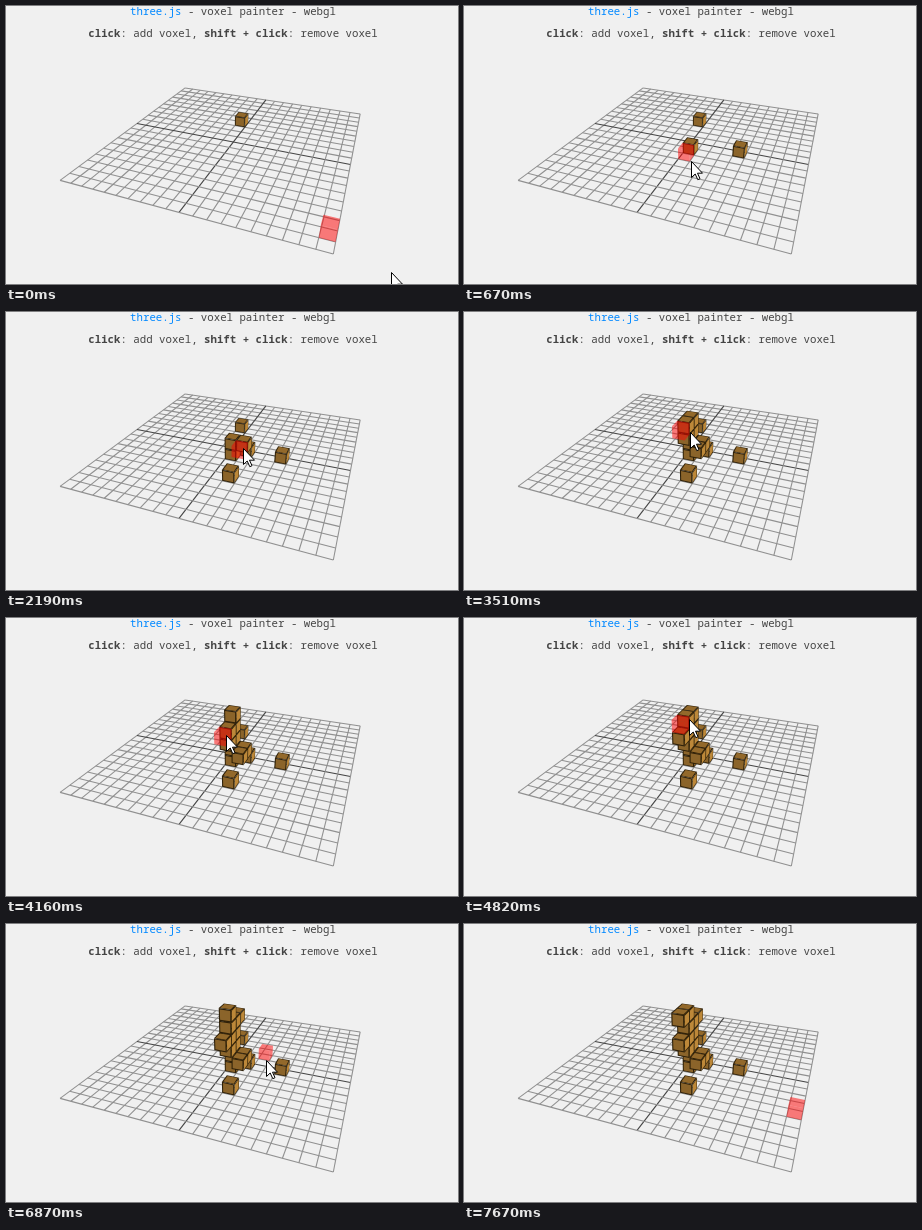
Animation, 452 px wide and 278 px high, one loop 8.13 s. Source, as an HTML page with a canvas:

```html
<!DOCTYPE html>
<html lang="en">
<head>
<meta charset="utf-8">
<title>voxel painter</title>
<style>
  html, body { margin: 0; width: 100%; height: 100%; overflow: hidden; background: #f0f0f0; }
  canvas { position: absolute; left: 0; top: 0; display: block; }
  p {
    position: absolute; left: 0; width: 100%; margin: 0; text-indent: 2px;
    font: 10.72px/14px "Noto Sans Mono", monospace; color: #444;
    text-align: center; white-space: nowrap;
  }
  p span { color: #08f; }
</style>
</head>
<body>
<canvas width="452" height="278"></canvas>
<p style="top:-2px"><span>three.js</span> - voxel painter - webgl</p>
<p style="top:20px"><b>click</b>: add voxel, <b>shift + click</b>: remove voxel</p>
<script>
const ctx = document.querySelector('canvas').getContext('2d');
const LOOP = 8130, BEAT = LOOP / 29, STEP = 66;
const FOCAL = 364, CX = 227.4, CY = 136;
const SIZE = 50, HALF = SIZE / 2;
const WOOD = ['#bd8839', '#93692b', '#8b642a'];
const EDGE = '#2e2009', MARKER = 'rgba(255,0,0,.5)';

// Camera basis
const dot = (a, b) => a[0] * b[0] + a[1] * b[1] + a[2] * b[2];
const cross = (a, b) => [a[1] * b[2] - a[2] * b[1], a[2] * b[0] - a[0] * b[2], a[0] * b[1] - a[1] * b[0]];
const unit = a => a.map(c => c / Math.hypot(...a));
const eye = [500, 800, 1300];
const forward = unit(eye.map(c => -c));
const right = unit(cross(forward, [0, 1, 0]));
const up = cross(right, forward);

function project(p) {
  const d = p.map((c, i) => c - eye[i]);
  const k = FOCAL / dot(d, forward);
  return [CX + k * dot(d, right), CY - k * dot(d, up)];
}

// One stop per beat: three numbers fill a grid cell, two are a screen point
const stops = [
  [385, 266], [4, 0, 0], [0, 0, 1], [1, 0, 4], [1, 0, 0], [233, 145],
  [0, 1, 1], [1, 1, 1], [1, 1, 2], [0, 2, 1], [0, 3, 1], [0, 2, 2], [0, 3, 2], [229, 120],
  [0, 4, 1], [0, 3, 3], [0, 4, 2], [225.5, 101.5], [0, 5, 2], [0, 4, 0], [221, 95],
  [223, 83], [223, 83], [335, 215], [335, 215], [0, 5, 3], [217.5, 89], [461, 298]
];

// The pointer rests, then glides to the next stop
const REST = 0.2, GLIDE = 0.7;
// Offset from the pointer's tip to its active point
const HOT = [-1.5, -2];

const center = cell => cell.map(c => c * SIZE + HALF);
const voxels = [{ born: 0, pos: center([-1, 0, -4]) }];
const filled = pos => voxels.some(v => v.pos.join() === pos.join());

// A click lands on the face the new voxel rests against: below, behind or beside
function clickPoint(pos) {
  const behind = axis => pos.map((c, i) => i === axis ? c - SIZE : c);
  const axis = pos[1] < SIZE || filled(behind(1)) ? 1 : filled(behind(2)) ? 2 : 0;
  const contact = pos.map((c, i) => i === axis ? c - HALF : c);
  return project(contact).map((c, i) => c - HOT[i]);
}

const path = stops.map((stop, i) => {
  if (stop.length === 2) return stop;
  const pos = center(stop), point = clickPoint(pos);
  voxels.push({ born: (i + REST) * BEAT, pos });
  return point;
});

function pointerAt(t) {
  const i = Math.floor(t / BEAT), last = path.length - 1;
  const u = Math.min(1, Math.max(0, (t / BEAT - i - REST) / GLIDE));
  const ease = 1 - (1 - u) ** 2;
  const from = path[Math.min(i, last)], to = path[Math.min(i + 1, last)];
  return from.map((c, k) => c + (to[k] - c) * ease);
}

// Cell next to the surface under the pointer, or null
function pick(t) {
  const [x, y] = pointerAt(t);
  const u = (x + HOT[0] - CX) / FOCAL, v = (CY - y - HOT[1]) / FOCAL;
  const ray = forward.map((c, i) => c + u * right[i] + v * up[i]);
  let near = Infinity, cell = null;
  function hit(middle, half, axis, level) {
    const s = (level - eye[axis]) / ray[axis];
    if (s <= 0 || s >= near) return;
    const p = eye.map((c, i) => c + s * ray[i]);
    if (p.some((c, i) => i !== axis && Math.abs(c - middle[i]) > half)) return;
    p[axis] = level + 1;
    near = s;
    cell = p.map(c => Math.floor(c / SIZE));
  }
  hit([0, 0, 0], 500, 1, 0);
  for (const { born, pos } of voxels)
    if (born <= t) pos.forEach((c, axis) => hit(pos, HALF, axis, c + HALF));
  return cell;
}

// Off the board the marker keeps its last cell
function markerAt(t) {
  for (; t >= 0; t -= 3) {
    const cell = pick(t);
    if (cell) return center(cell);
  }
  return center([9, 0, 8]);
}

function face(pos, axis, half, color) {
  const a = (axis + 1) % 3, b = (axis + 2) % 3;
  ctx.beginPath();
  for (const [i, j] of [[-1, -1], [1, -1], [1, 1], [-1, 1]]) {
    const p = [...pos];
    p[axis] += HALF;
    p[a] += i * half;
    p[b] += j * half;
    ctx.lineTo(...project(p));
  }
  ctx.fillStyle = color;
  ctx.fill();
}

function drawVoxel({ pos, marker }) {
  for (const axis of [1, 2, 0]) {
    face(pos, axis, HALF, marker ? MARKER : EDGE);
    if (!marker) face(pos, axis, HALF * 0.82, WOOD[axis]);
  }
}

function line(a, b) {
  ctx.beginPath();
  ctx.moveTo(...project(a));
  ctx.lineTo(...project(b));
  ctx.stroke();
}

function drawGrid() {
  ctx.lineWidth = 1.1;
  for (let k = -500; k <= 500; k += SIZE) {
    ctx.strokeStyle = k ? '#909090' : '#444';
    line([k, 0, -500], [k, 0, 500]);
    line([-500, 0, k], [500, 0, k]);
  }
}

const arrow = new Path2D('M.5.5V16.5L4.2 13L6.8 18.7L9 17.7L6.5 12.2H11.5Z');

function drawPointer([x, y]) {
  ctx.save();
  ctx.translate(Math.floor(x), Math.floor(y));
  ctx.fillStyle = '#fff';
  ctx.fill(arrow);
  ctx.lineWidth = 1;
  ctx.strokeStyle = '#000';
  ctx.stroke(arrow);
  ctx.restore();
}

function frame() {
  const now = performance.now() % LOOP;
  const t = Math.floor(now / STEP) * STEP;
  const depth = ({ pos }) => pos[0] + pos[1] + pos[2];
  ctx.clearRect(0, 0, 452, 278);
  drawGrid();
  [...voxels.filter(v => v.born <= t), { pos: markerAt(t), marker: true }]
    .sort((a, b) => depth(a) - depth(b))
    .forEach(drawVoxel);
  drawPointer(pointerAt(t));
  requestAnimationFrame(frame);
}
frame();
</script>
</body>
</html>
```
